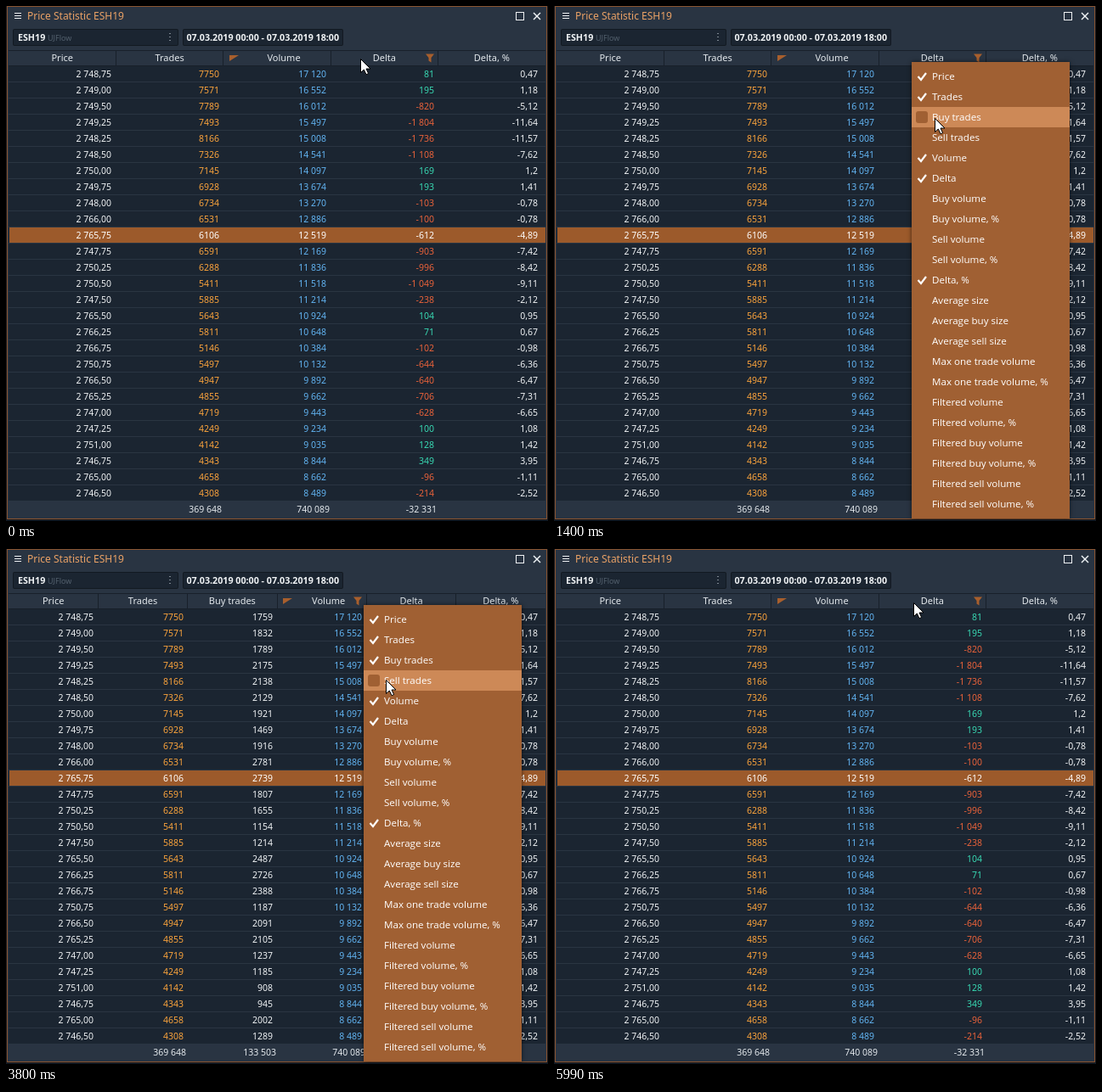
Recreate the animation shown at these times as an HTML page with a canvas. Size 638 by 607 pixels, loop 6310 ms.

```html
<!DOCTYPE html>
<html lang="en">
<head>
<meta charset="utf-8">
<title>Price Statistic</title>
<style>
  html, body { margin: 0; width: 100%; height: 100%; overflow: hidden; background: #1b2531; }
  canvas { display: block; }
</style>
</head>
<body>
<canvas id="stage" width="638" height="607"></canvas>
<script>
const ctx = document.getElementById('stage').getContext('2d');
const LOOP = 6310, STEP = 76;
const SANS = '"Noto Sans", "Open Sans", sans-serif';
const PANEL = '#293442', FIELD = '#1b2531', DARK = '#18202a', LINE = '#2a3542';
const ACCENT = '#9c5a2b', WHITE = '#f0f3f5';
const ROWS = 27, SELECTED_ROW = 10, FILTER_COLUMN = 3;
const LEFT = 3, RIGHT = 635, ROW = 19, TABLE_TOP = 70;
const MENU = { x: 421, y: 66, w: 186, h: 538, first: 71, row: 24 };

// Seeded noise in 0..1.
const noise = (n, seed) => {
  const v = Math.sin(n * 12.9898 + seed * 78.233) * 43758.5453;
  return v - Math.floor(v);
};

// Price levels cluster around a main and a second peak; a lower score ranks higher.
function priceLevels(from, to, peak, handicap) {
  const levels = [];
  for (let price = from; price <= to; price += .25)
    levels.push({ price, score: handicap + Math.abs(price - peak) + noise(price, 1) * .5 });
  return levels;
}

const rows = [...priceLevels(2746, 2751, 2749, 0), ...priceLevels(2764.25, 2767.5, 2766, 1.2)]
  .sort((a, b) => a.score - b.score)
  .slice(0, ROWS)
  .map(({ price }, i) => {
    const volume = Math.round(17120 * Math.exp(-.034 * i + .00027 * i * i));
    const trades = Math.round(volume * (.45 + .1 * noise(i, 2)));
    const buyShare = (price > 2760 ? .42 : .2) + .1 * noise(i, 3);
    const swing = -3.5 + 6 * Math.cos((i - 7.6) * Math.PI / 4) + 6 * (noise(i, 4) - .5);
    return { price, volume, trades, buys: Math.round(trades * buyShare),
      delta: Math.round(volume * swing / 100) };
  });

const grouped = n => String(n).replace(/\B(?=(\d{3})+$)/g, ' ');
const white = () => WHITE;

const columns = [
  { name: 'Price', color: white,
    cell: r => grouped(Math.floor(r.price)) + ',' + r.price.toFixed(2).slice(-2) },
  { name: 'Trades', color: () => '#fba43c', cell: r => r.trades, total: '369 648' },
  { name: 'Buy trades', color: white, cell: r => r.buys, total: '133 503',
    from: 1630, totalFrom: 2090, to: 4510 },
  { name: 'Sell trades', color: white, cell: r => r.trades - r.buys, total: '236 145',
    from: 2320, totalFrom: 2790, to: 3800 },
  { name: 'Volume', color: () => '#62b4f2', cell: r => grouped(r.volume), total: '740 089', sorted: true },
  { name: 'Delta', color: r => r.delta < 0 ? '#e9623a' : '#38d8b2',
    cell: r => grouped(r.delta), total: '-32 331' },
  { name: 'Delta, %', color: white,
    cell: r => String(+(r.delta / r.volume * 100).toFixed(2)).replace('.', ',') }
];

const menuItems = ['Price', 'Trades', 'Buy trades', 'Sell trades', 'Volume', 'Delta',
  'Buy volume', 'Buy volume, %', 'Sell volume', 'Sell volume, %', 'Delta, %',
  'Average size', 'Average buy size', 'Average sell size',
  'Max one trade volume', 'Max one trade volume, %', 'Filtered volume', 'Filtered volume, %',
  'Filtered buy volume', 'Filtered buy volume, %', 'Filtered sell volume', 'Filtered sell volume, %'];

// Pointer legs: start time, number of steps, end x, end y.
const legs = [[790, 1, 418, 62], [940, 2, 431, 78], [1092, 5, 448, 132], [1700, 5, 447, 154],
  [3970, 3, 448, 133], [5050, 7, 433, 35], [5670, 5, 423, 63]];

const stepsDone = (t, start, count) =>
  Math.max(0, Math.min(count, 1 + Math.floor((t - start) / STEP)));

function pointerAt(t) {
  let x = 417, y = 62;
  for (const [start, count, endX, endY] of legs) {
    const part = stepsDone(t, start, count) / count;
    x += (endX - x) * part;
    y += (endY - y) * part;
  }
  return { x: Math.round(x), y: Math.round(y) };
}

const isShown = (column, t) => !column.from || (t >= column.from && t < column.to);

function rect(x, y, w, h, color) {
  ctx.fillStyle = color;
  ctx.fillRect(x, y, w, h);
}

function frame(x, y, w, h, color) {
  ctx.strokeStyle = color;
  ctx.lineWidth = 1;
  ctx.strokeRect(x + .5, y + .5, w - 1, h - 1);
}

function box(x, y, w, h, radius, color) {
  ctx.fillStyle = color;
  ctx.beginPath();
  ctx.roundRect(x, y, w, h, radius);
  ctx.fill();
}

function text(string, x, baseline, color, align = 'left', font = '11px', family = SANS) {
  ctx.font = `${font} ${family}`;
  ctx.fillStyle = color;
  ctx.textAlign = align;
  ctx.fillText(string, x, baseline);
}

function path(points, x = 0, y = 0) {
  ctx.beginPath();
  points.forEach(([px, py]) => ctx.lineTo(x + px, y + py));
}

function polygon(points, x, y, color) {
  path(points, x, y);
  ctx.closePath();
  ctx.fillStyle = color;
  ctx.fill();
}

function stroke(points, x, y, color, width) {
  path(points, x, y);
  ctx.strokeStyle = color;
  ctx.lineWidth = width;
  ctx.stroke();
}

function drawWindow() {
  rect(0, 0, 638, 607, '#141a22');
  rect(1, 0, 636, 605, PANEL);
  frame(1, 0, 636, 605, '#8a5430');
  for (const y of [8, 11, 14]) rect(10, y, 8, 1, WHITE);
  text('Price Statistic ESH19', 25, 16, '#eba266', 'left', '12px');
  frame(600, 7, 10, 10, WHITE);
  stroke([[0, 0], [8, 8]], 621, 8, WHITE, 1.4);
  stroke([[8, 0], [0, 8]], 621, 8, WHITE, 1.4);

  for (const [x, w] of [[8, 195], [208, 189]]) {
    box(x, 27, w, 20, 2, '#121921');
    box(x + 1, 28, w - 2, 18, 1, FIELD);
  }
  text('ESH19', 14, 41, WHITE, 'left', 'bold 10.7px');
  text('UJFlow', 49, 41, '#53606d', 'left', '9px');
  for (const y of [33, 37, 41]) rect(192, y - 1, 2, 1, '#7d8791');
  text('07.03.2019 00:00 - 07.03.2019 18:00', 212.5, 41, WHITE, 'left', 'bold 10.7px');
}

function drawTable(t) {
  rect(LEFT, 52, RIGHT - LEFT, 1, DARK);
  rect(LEFT, TABLE_TOP, RIGHT - LEFT, 514, FIELD);
  for (let i = 0; i < ROWS; i++) {
    const y = TABLE_TOP + i * ROW;
    rect(LEFT, y, RIGHT - LEFT, 1, i ? LINE : DARK);
    if (i === SELECTED_ROW) rect(LEFT + 1, y + 1, RIGHT - LEFT - 1, ROW - 1, ACCENT);
  }
  rect(LEFT, 583, RIGHT - LEFT, 1, LINE);

  const shown = columns.filter(column => isShown(column, t));
  const width = (RIGHT - LEFT) / shown.length;
  shown.forEach((column, n) => {
    const left = LEFT + n * width, right = left + width;
    const isLast = n === shown.length - 1;
    text(column.name, left + width / 2 + (column.sorted ? 8 : 0), 65, '#e3e8ec', 'center');
    if (!isLast) rect(Math.floor(right), 53, 1, 17, DARK);
    if (column.sorted) polygon([[0, 0], [11, 0], [0, 7]], Math.round(left) + 7, 58, '#a85f2d');
    if (n === FILTER_COLUMN)
      polygon([[-5, 0], [5, 0], [1.5, 4.5], [1.5, 10], [-1.5, 8], [-1.5, 4.5]],
        Math.round(right) - 10, 56.5, '#a85f2d');
    const cellRight = Math.round(right - (isLast ? 9 : 5));
    rows.forEach((row, i) => text(column.cell(row), cellRight, 84 + i * ROW,
      i === SELECTED_ROW ? '#fff' : column.color(row), 'right', '10.5px'));
    if (column.total && t >= (column.totalFrom || 0))
      text(column.total, Math.round(right - 1.4), 597, '#e3e8ec', 'right', '10.5px');
  });
}

function drawMenu(t, pointer) {
  const alpha = (stepsDone(t, 380, 4) - stepsDone(t, 5670, 4)) / 4;
  if (!alpha) return;
  ctx.save();
  ctx.globalAlpha = alpha;
  ctx.shadowColor = 'rgba(0,0,0,.6)';
  ctx.shadowBlur = 5;
  rect(MENU.x, MENU.y, MENU.w, MENU.h, '#a06033');
  ctx.shadowColor = 'transparent';
  const hovered = pointer.x >= MENU.x ? Math.floor((pointer.y - MENU.first) / MENU.row) : -1;
  menuItems.forEach((item, i) => {
    const top = MENU.first + i * MENU.row;
    if (i === hovered) {
      rect(MENU.x, top, MENU.w, MENU.row, '#cd8957');
      box(426, top + 5, 14, 14, 3, '#a06033');
    }
    const column = columns.find(c => c.name === item);
    if (column && isShown(column, t))
      stroke([[0, 0], [3.5, 4], [9.5, -4]], 428.5, top + 12, '#fff', 2.2);
    text(item, 445, top + 16, '#fff', 'left', '500 11.6px', '"Open Sans", "Noto Sans", sans-serif');
  });
  ctx.restore();
}

function drawPointer({ x, y }) {
  const arrow = [[.5, .5], [.5, 16.5], [4.3, 13], [7, 18.7], [9.6, 17.5], [7, 12], [12, 12]];
  polygon(arrow, x, y, '#fff');
  ctx.strokeStyle = '#000';
  ctx.lineWidth = 1;
  ctx.stroke();
}

function draw(now) {
  const t = now % LOOP;
  const pointer = pointerAt(t);
  drawWindow();
  drawTable(t);
  drawMenu(t, pointer);
  drawPointer(pointer);
  requestAnimationFrame(draw);
}
requestAnimationFrame(draw);
</script>
</body>
</html>
```
